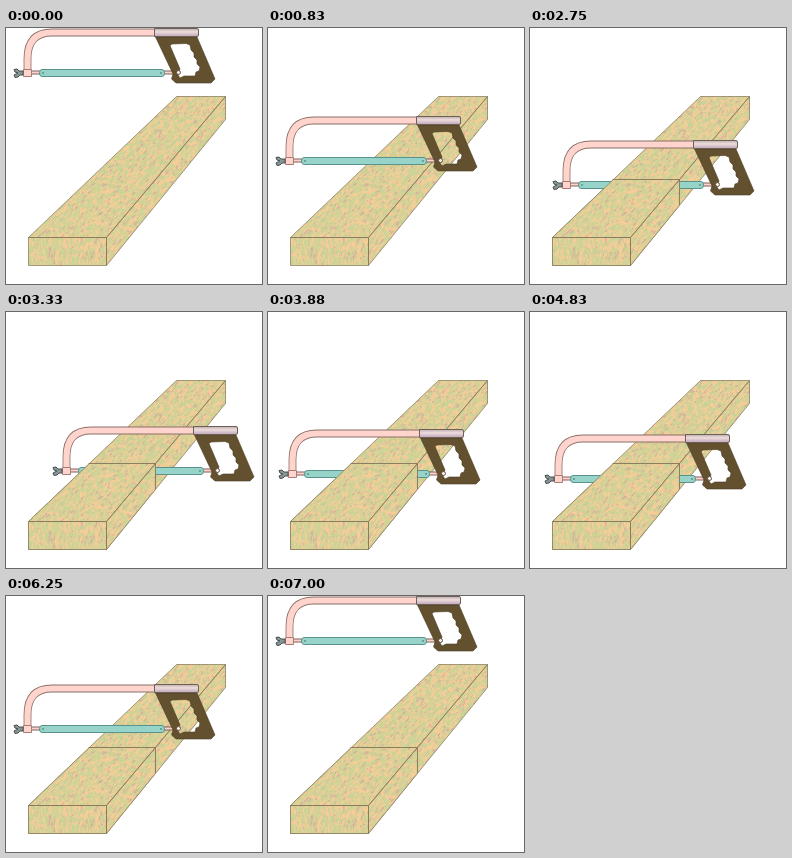
Write an HTML page with a canvas that moves like this. It is 256 px wide and 256 px high and loops after 8000 ms.

```html
<!DOCTYPE html>
<html lang="en">
<head>
<meta charset="utf-8">
<title>Hacksaw cutting a beam</title>
<style>
html, body { margin: 0; width: 100%; height: 100%; overflow: hidden; background: #fff; }
canvas { display: block; }
</style>
</head>
<body>
<canvas id="stage" width="256" height="256"></canvas>
<script>
const ctx = document.getElementById('stage').getContext('2d');
const LOOP = 8000, STEP = 125 / 3, LAST = 168;
const EDGE = '#85765a';

// Saw position: [step, x, y], linear in between
const KEYS = [[0, 0, 0], [24, 0, 106], [34, 47, 106.7], [46, 0, 107.5]];
for (let i = 0; i < 4; i++) {
  const start = 46 + 24 * i, y = 107.5 + 4.9 * i;
  KEYS.push([start + 12, 47, y + 2.45], [start + 24, 0, y + 4.9]);
}
KEYS.push([LAST, 0, 0]);

const lerp = (a, b, t) => a + (b - a) * t;
const mix = (p, q, t) => [lerp(p[0], q[0], t), lerp(p[1], q[1], t)];

function sawAt(step) {
  const i = Math.max(1, KEYS.findIndex(k => k[0] >= step));
  const a = KEYS[i - 1], b = KEYS[i], t = (step - a[0]) / (b[0] - a[0]);
  return [Math.floor(lerp(a[1], b[1], t)), Math.round(lerp(a[2], b[2], t))];
}

function polygon(points) {
  const path = new Path2D();
  points.forEach(p => path.lineTo(...p));
  path.closePath();
  return path;
}

function paint(c, path, fill, line, width = 1) {
  if (fill) { c.fillStyle = fill; c.fill(path); }
  if (line) { c.strokeStyle = line; c.lineWidth = width; c.stroke(path); }
}

// Wood: three faces with grain running from edge a-b to edge d-c
const A = [22.5, 209.5], B = [100.5, 209.5], C = [219.5, 68.5], D = [170.5, 68.5];
const E = [22.5, 237.5], F = [100.5, 237.5], G = [219.5, 91.5];
const FACES = [
  { corners: [A, B, C, D], count: 2600, length: 0.018 },
  { corners: [F, B, C, G], count: 1000, length: 0.02 },
  { corners: [E, F, B, A], count: 480, length: 0.16 }
];
const BASE = '#d6d297';
const GRAIN = ['#f9cc98', '#f9cc98', '#f9cc98', '#f9cc98', '#c6d496', '#c6d496', '#c6d496', '#cbcb98', '#d8b09c'];

function makeWood() {
  const canvas = document.createElement('canvas');
  canvas.width = canvas.height = 256;
  const c = canvas.getContext('2d');
  let seed = 7;
  const rand = () => (seed = seed * 16807 % 2147483647) / 2147483647;
  for (const { corners, count, length } of FACES) {
    const [a, b, cc, d] = corners, face = polygon(corners);
    paint(c, face, BASE);
    c.save();
    c.clip(face);
    for (let i = 0; i < count; i++) {
      const s = rand(), t = rand();
      const from = mix(a, b, s), to = mix(d, cc, s);
      c.beginPath();
      c.moveTo(...mix(from, to, t));
      c.lineTo(...mix(from, to, t + length * (0.3 + rand())));
      c.strokeStyle = GRAIN[Math.floor(rand() * GRAIN.length)];
      c.lineWidth = 1.4;
      c.stroke();
    }
    c.restore();
  }
  FACES.forEach(f => paint(c, polygon(f.corners), null, EDGE, 0.7));
  return canvas;
}

const wood = makeWood();
const frontPiece = polygon([[82, 152], [150, 152], [150, 178], [101, 239], [21, 239], [21, 209]]);
const cut = new Path2D('M82.5 151.5H149.5V177');

const tube = new Path2D('M150 4.5H46C29 4.5 21.5 14 21.5 31V48');
const foot = new Path2D('M17.5 41.5H25.5V48.5H17.5Z');
const rods = new Path2D('M26 44.5H35M157 44.5H172');
const blade = new Path2D('M36 41.5H156Q158.5 41.5 158.5 45T156 48.5H36Q33.5 48.5 33.5 45T36 41.5Z');
const pins = new Path2D('M36 45h2M154 45h2');
const nut = new Path2D('M17 43L13 43L11 41L8 41.5L9 44L12 45L8 47L9 49.5L12 49L14 47H17Z');
const sleeve = new Path2D('M148.5 0.5H191Q192.5 0.5 192.5 2V7Q192.5 8.5 191 8.5H148.5Z');
const handle = new Path2D('M149.5 9H191L209 51L205 55H170L165.5 51L167 46Z' +
  'M164 17.5L166 16L180 15.5L184 17L185 22L188 25L188 29L191 32L191 36L194 39L193 43L190 44L189 48H178L174 50L172 47L174 41Z');
const bolt = new Path2D('M174.5 44.5A2 2 0 1 1 170.5 44.5A2 2 0 1 1 174.5 44.5Z');

const steel = ctx.createLinearGradient(0, 1, 0, 9);
steel.addColorStop(0, '#c4b4b4');
steel.addColorStop(0.35, '#eedcdc');
steel.addColorStop(1, '#b8a0b4');

function drawSaw(x, y) {
  ctx.save();
  ctx.translate(x, y);
  paint(ctx, rods, null, '#80605c', 4);
  paint(ctx, rods, null, '#ffd4cc', 2);
  paint(ctx, blade, '#96d4ca', '#5b938c');
  paint(ctx, pins, null, '#6ba29b', 2);
  paint(ctx, tube, null, '#8a7068', 7.8);
  paint(ctx, tube, null, '#ffd4cc', 6.2);
  paint(ctx, foot, '#ffd4cc', '#a87c76');
  paint(ctx, nut, '#8a9696', '#465050');
  ctx.fillStyle = '#62502f';
  ctx.fill(handle, 'evenodd');
  paint(ctx, handle, null, '#4c3e22', 0.6);
  paint(ctx, bolt, '#fff0ec', '#665548');
  paint(ctx, sleeve, steel, '#6c6058');
  ctx.restore();
}

function draw(now) {
  const step = Math.min(LAST, Math.floor((now % LOOP + 4) / STEP));
  ctx.fillStyle = '#fff';
  ctx.fillRect(0, 0, 256, 256);
  ctx.drawImage(wood, 0, 0);
  drawSaw(...sawAt(step));
  if (step >= 24) {
    // The near part of the beam hides the sunken blade
    ctx.save();
    ctx.clip(frontPiece);
    ctx.drawImage(wood, 0, 0);
    ctx.restore();
    paint(ctx, cut, null, EDGE, 0.9);
  }
}

const begin = performance.now();
function tick() {
  draw(performance.now() - begin);
  requestAnimationFrame(tick);
}
tick();
</script>
</body>
</html>
```
